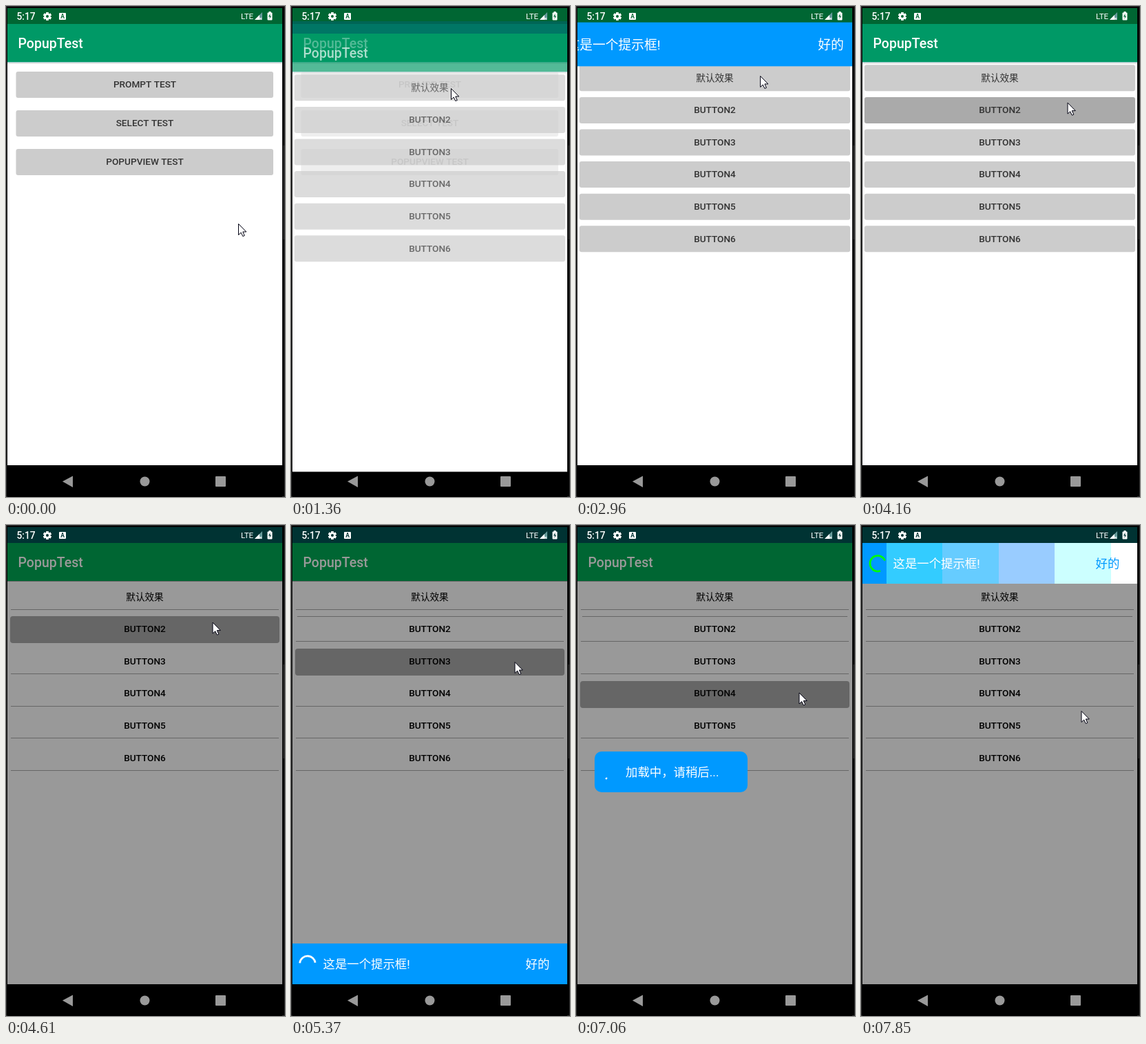
An HTML page with a canvas for the animation above (8 s loop, 405 by 711 pixels).

```html
<!DOCTYPE html>
<html lang="zh-CN">
<head>
<meta charset="utf-8">
<title>Popup demo</title>
<style>
html, body { margin: 0; width: 100%; height: 100%; overflow: hidden; background: #000; }
canvas { display: block; }
</style>
</head>
<body>
<canvas id="stage" width="405" height="711"></canvas>
<script>
const g = document.getElementById('stage').getContext('2d');
const LOOP = 8000, BLUE = '#0099ff';
const FONT = 'Roboto, "Noto Sans CJK SC", "Noto Sans CJK", sans-serif';

const FIRST = 115, BEAT = 404, BURST = 75;
function captured(t) {
  const start = FIRST + BEAT * Math.floor((t - FIRST) / BEAT);
  return start + Math.min(t - start, BURST);
}

const progress = (c, from, to) => Math.min(1, Math.max(0, (c - from) / (to - from)));
const mix = (a, b, u) => a + (b - a) * u;
const tween = (c, from, to, a, b) => mix(a, b, progress(c, from, to));
const during = (c, from, to) => c >= from && c < to;

// Pointer waypoints: time, x, y.
const path = [
  [0, 337.5, 315.5], [190, 333.5, 290.5], [594, 232.5, 119.5], [2060, 232.5, 119.5],
  [2135, 267.5, 101.5], [2960, 267.5, 101.5], [3018, 275, 98.5], [3422, 360, 57.5],
  [3826, 300, 139.5], [4610, 300, 141], [5038, 325, 198.5], [5846, 325, 198.5],
  [6250, 325, 225], [6654, 324, 243], [7387, 324, 243], [7850, 320, 269.5]
];

function pointerAt(c) {
  const next = path.findIndex(p => p[0] > c);
  const b = path.at(next), a = next > 0 ? path[next - 1] : b;
  return [1, 2].map(i => tween(c, a[0], b[0] + .01, a[i], b[i]));
}

// Each press starts on a beat; the nth press lands on the nth button of its page.
const presses = [900, 4155, 5367, 6983], PRESS = 460;
const pressedAt = c => presses.findIndex(start => during(c, start, start + PRESS));

function rect(x, y, w, h, color) {
  g.fillStyle = color;
  g.fillRect(x, y, w, h);
}

function round(x, y, w, h, r, color) {
  g.fillStyle = color;
  g.beginPath();
  g.roundRect(x, y, w, h, r);
  g.fill();
}

function poly(color, ...points) {
  g.fillStyle = color;
  g.beginPath();
  for (let i = 0; i < points.length; i += 2) g.lineTo(points[i], points[i + 1]);
  g.closePath();
  g.fill();
}

function disc(x, y, r, color) {
  g.fillStyle = color;
  g.beginPath();
  g.arc(x, y, r, 0, 7);
  g.fill();
}

function label(text, x, y, size, color, weight = 400, align = 'left') {
  g.font = `${weight} ${size}px ${FONT}`;
  g.textAlign = align;
  g.fillStyle = color;
  g.fillText(text, x, y);
}

function clipped(y, h, draw) {
  g.save();
  g.beginPath();
  g.rect(2, y, 399, h);
  g.clip();
  draw();
  g.restore();
}

function header(dim) {
  rect(2, 26, 399, 55, dim ? '#006633' : '#009966');
  rect(2, 81, 399, 1, dim ? '#666' : '#99cccc');
  if (!dim) rect(2, 82, 399, 1.5, '#ddd');
  label('PopupTest', 17.5, 61, 19.5, dim ? '#999' : '#fff', 500);
}

function button(text, x, y, w, pressed, dim) {
  if (!dim) round(x, y, w, 38, 3, pressed ? '#aaa' : '#ccc');
  else if (pressed) round(x + 1, Math.ceil(y), w - 2, 39, 4, '#666');
  else rect(x + 2, Math.round(y + 36.4), w - 4, 1, '#666');
  const weight = text[0] > '~' ? 400 : 500;
  label(text, 201.5, Math.round(y + 23.2), 13.6, dim ? '#000' : '#333', weight, 'center');
}

function mainPage(pressed) {
  rect(2, 81, 399, 604, '#fff');
  header(false);
  ['PROMPT', 'SELECT', 'POPUPVIEW'].forEach((name, i) =>
    button(name + ' TEST', 14.5, 95 + 56 * i, 373.5, pressed === i, false));
}

function demoPage(pressed, dim) {
  rect(2, 81, 399, 584, dim ? '#999' : '#fff');
  for (let i = 0; i < 6; i++)
    button(i ? 'BUTTON' + (i + 1) : '默认效果', 5, 85.3 + 46.6 * i, 393, pressed === i, dim);
  if (dim && pressed !== 1) rect(9, 132, 385, 1, '#666');
  header(dim);
}

function statusIcons(back) {
  label('5:17', 15.5, 20, 13.8, '#fff', 500);
  g.save();
  g.translate(60, 15);
  for (let i = 0; i < 6; i++) {
    rect(-1.6, -6, 3.2, 12, '#fff');
    g.rotate(Math.PI / 3);
  }
  disc(0, 0, 4.5, '#fff');
  disc(0, 0, 2, back);
  g.restore();
  round(77, 10, 10, 10, 1, '#fff');
  label('A', 82, 18, 8.5, back, 700, 'center');
  label('LTE', 341, 19, 11.6, '#fff');
  poly('#669999', 361, 20, 372, 9, 372, 20);
  poly('#fff', 361, 20, 368, 13, 368, 20);
  label('×', 367.5, 21, 8, '#fff', 700);
  round(379.5, 9.5, 7, 11, 1, '#fff');
  rect(381.5, 8, 3, 2, '#fff');
  poly(back, 383.5, 11, 381, 15.5, 383, 15.5, 382.5, 19, 385, 14.5, 383.3, 14.5);
}

function navBar(y) {
  rect(2, y, 399, 711 - y, '#000');
  poly('#999', 82, 688.5, 97, 680.5, 97, 697);
  disc(201.5, 688.5, 7, '#999');
  round(304, 681, 15, 15, 1, '#999');
}

// The arc turns steadily while it grows and shrinks.
function spinner(x, y, c, color) {
  const age = c - 7058;
  const start = (122 + age * .389) * Math.PI / 180;
  const sweep = .2 + 4.9 * Math.sin(Math.PI * age / 1333) ** 2;
  g.strokeStyle = color;
  g.lineWidth = 2.8;
  g.beginPath();
  g.arc(x, y, 11.3, start, start + sweep);
  g.stroke();
}

function bar(y, textX, fill, okColor) {
  rect(2, y, 399, 59, fill);
  label('这是一个提示框!', textX, y + 36, 17.4, '#fff');
  label('好的', 340.5, y + 36, 17.4, okColor);
}

// Hard-edged colour bands of equal width after the first one.
function bandedFill() {
  const fill = g.createLinearGradient(2, 0, 401, 0);
  const colors = [BLUE, '#33ccff', '#66ccff', '#99ccff', '#ccffff', '#fff'];
  const edge = i => i ? Math.min(1, (35 + 81.5 * (i - 1)) / 399) : 0;
  colors.forEach((color, i) => {
    fill.addColorStop(edge(i), color);
    fill.addColorStop(edge(i + 1), color);
  });
  return fill;
}
const bands = bandedFill();

function prompt(c) {
  if (!during(c, 2500, 3826)) return;
  const u = progress(c, 2614, 3018);
  const grow = mix(.64, 1, u) + .3 * Math.sin(Math.PI * u);
  const scale = grow * tween(c, 3740, 3826, 1, 0);
  clipped(0, 711, () => {
    g.translate(201.5, 55.5);
    g.scale(scale, scale);
    g.translate(-201.5, -55.5);
    bar(26, 2, BLUE, '#fff');
  });
}

function bottomBar(c) {
  if (!during(c, 4612, 5771)) return;
  const y = tween(c, 4612, 5038, 635, 606);
  bar(y, 46.5, BLUE, '#fff');
  spinner(24, y + 29.5, c, '#fff');
}

function loader(c) {
  if (!during(c, 5771, 7387)) return;
  const x = tween(c, 5771, 6250, -164, 90) + tween(c, 6983, 7358, 0, -315);
  clipped(320, 80, () => {
    round(x, 328, 222, 59, 10, BLUE);
    label('加载中，请稍后...', x + 45, 364, 17.4, '#fff');
    spinner(x + 24, 358, c, '#fff');
  });
}

function topBar(c) {
  if (c < 7387) return;
  const y = tween(c, 7330, 7440, -33, 26);
  clipped(26, 59, () => {
    bar(y, 46.5, bands, BLUE);
    spinner(24.3, y + 29.7, c, '#00ff00');
  });
}

function pointer([x, y]) {
  g.save();
  g.translate(x, y);
  g.strokeStyle = '#001';
  g.lineWidth = 2;
  const shape = [0, 0, 0, 16, 3.7, 12.6, 6.3, 18, 8.8, 17, 6.3, 11.5, 11.3, 11.5];
  poly('#fff', ...shape);
  g.lineWidth = 1;
  g.stroke();
  g.restore();
}

function draw(c) {
  const pressed = pressedAt(c);
  const dim = c >= 4590;
  const offset = tween(c, 1690, 1794, 14, 0);
  const reveal = progress(c, 1280, 1400);
  const statusBack = dim ? '#003333' : '#006633';

  rect(0, 0, 405, 711, '#333');
  rect(1, 1, 403, 709, '#000');
  rect(402, 202, 2, 136, '#222');
  rect(2, 3, 399, 23, statusBack);

  if (reveal < 1) mainPage(pressed);
  if (reveal > 0) {
    g.save();
    g.globalAlpha = reveal;
    g.translate(0, offset);
    if (offset) rect(2, 8, 399, 18, '#006666');
    demoPage(pressed, dim);
    g.restore();
  }
  if (during(c, 4555, 4590)) rect(2, 3, 399, 662, 'rgba(0,0,0,.2)');
  statusIcons(statusBack);
  navBar(665 + offset * reveal);

  prompt(c);
  bottomBar(c);
  loader(c);
  topBar(c);
  pointer(pointerAt(c));
}

function frame() {
  draw(captured(performance.now() % LOOP));
  requestAnimationFrame(frame);
}
frame();
</script>
</body>
</html>
```
